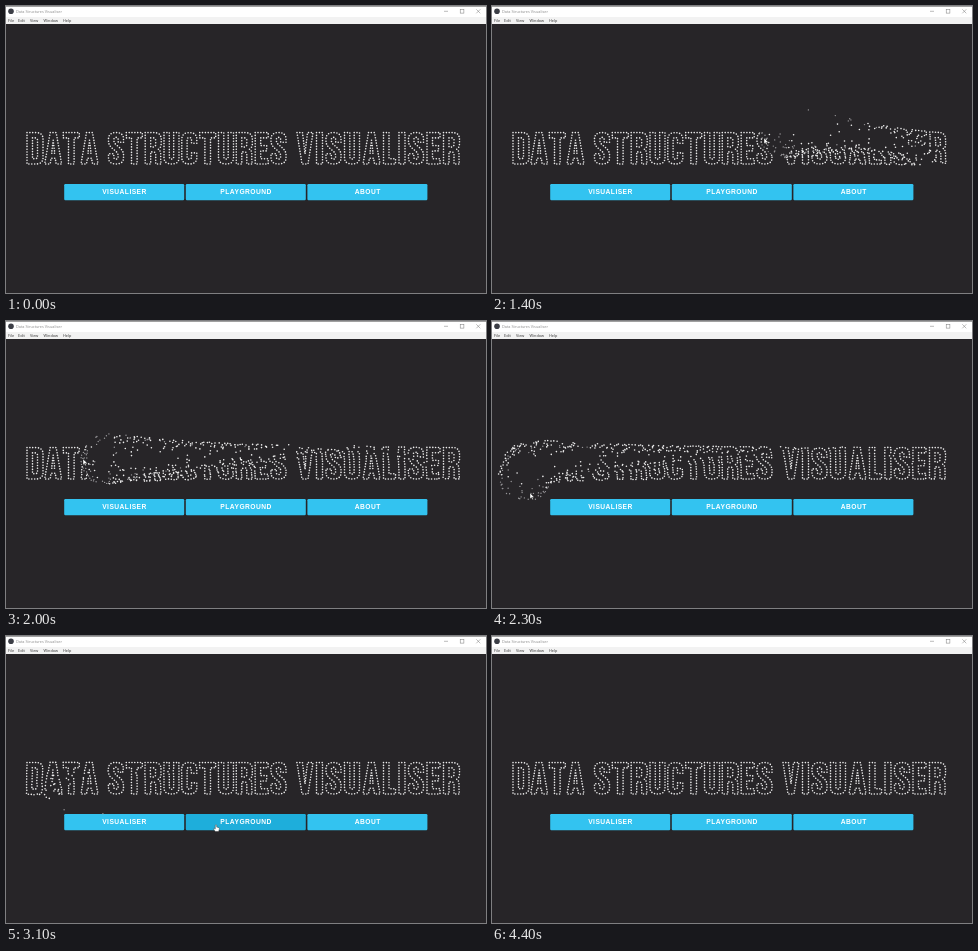
These frames come from a looping animation (480x287 px, 4.7 s). An HTML page:

```html
<!DOCTYPE html>
<html lang="en">
<head>
<meta charset="utf-8">
<title>Data Structures Visualiser</title>
<style>
  html, body { margin: 0; width: 100%; height: 100%; overflow: hidden; background: #272528; }
  svg { display: block; width: 100vw; height: 100vh; }
  .ui { font-family: "Open Sans", "Noto Sans", sans-serif; font-size: 3.85px; }
  .label { font: bold 6.7px "Liberation Sans", Arial, sans-serif; letter-spacing: .45px; fill: #fff; text-anchor: middle; }
  .dots { fill: none; stroke: #ededed; stroke-width: 1.6; stroke-linecap: round; }
  .dots.fast { stroke: #98979a; stroke-width: 1.4; }
  .cursor { fill: #fff; stroke: #222; stroke-width: .4; stroke-linejoin: round; }
</style>
</head>
<body>
<svg id="stage" viewBox="0 0 480 287">
  <rect width="480" height="287" fill="#272528"/>
  <rect width="480" height="18" fill="#fff"/>
  <rect y="11" width="480" height="7" fill="#f2f2f2"/>
  <rect width="480" height=".7" fill="#777"/>
  <circle cx="5" cy="5.3" r="2.8" fill="#3c3e46"/>
  <g class="ui" id="chrome">
    <text x="10" y="6.9" fill="#8a8a8a">Data Structures Visualiser</text>
  </g>
  <g fill="none" stroke="#777" stroke-width=".5">
    <path d="M438 5.3h4M470.3 3.3l4 4m0-4l-4 4"/>
    <rect x="454.2" y="3.4" width="3.7" height="3.7"/>
  </g>
  <g id="buttons"></g>
  <path class="dots fast" id="fast"/>
  <path class="dots" id="calm"/>
  <path class="cursor" id="arrow" d="M0 0V5.8L1.4 4.6L2.4 6.7L3.3 6.3L2.4 4.2H4.2Z"/>
  <path class="cursor" id="hand" d="M-.7 .5Q0-.5 .7 .5V2.6L3 3.2Q3.6 3.5 3.4 4.4L2.6 7H-.8L-2.4 4.4Q-2.3 3.5-1.4 3.9L-.7 4.4Z"/>
</svg>
<script>
const LOOP = 4700, FRAME = 100, SUBSTEPS = 4;
const RADIUS = 27, LAG = 65, SPACING = 2.85, TOP = 126.6, STRETCH = 0.965;

const $ = id => document.getElementById(id);

function add(parent, tag, attrs, text = '') {
  const node = document.createElementNS('http://www.w3.org/2000/svg', tag);
  for (const key in attrs) node.setAttribute(key, attrs[key]);
  node.textContent = text;
  parent.append(node);
  return node;
}

// Each glyph: width and outline contours
const glyphs = {
  D: [16, 'M0 0H9Q16 0 16 7V26Q16 32.5 9 32.5H0Z M5.5 5.5V27H8Q10.5 27 10.5 25V8Q10.5 5.5 8 5.5Z'],
  A: [17, 'M5.5 0H11.5L17 32.5H11.5L10.6 26.5H6.4L5.5 32.5H0Z M8.5 8L6.9 21.5H10.1Z'],
  T: [16, 'M0 0H16V5.5H10.8V32.5H5.2V5.5H0Z'],
  S: [15, 'M15 10V7Q15 0 7.5 0Q0 0 0 7V9Q0 13 4 16.5L7 19Q9.7 21.5 9.7 24Q9.7 27.5 7.5 27.5Q5.3 27.5 5.3 25V22H0V26Q0 32.5 7.5 32.5Q15 32.5 15 26V23Q15 19 11 15.5L8 13Q5.3 10.5 5.3 8Q5.3 5 7.5 5Q9.7 5 9.7 8V10Z'],
  R: [16, 'M0 0H9Q16 0 16 7V11Q16 16 13 17.3Q15.5 18.5 15.5 22V29L16 32.5H10.5V23Q10.5 20 8 20H5.5V32.5H0Z M5.5 5.5V15H8Q10.5 15 10.5 12V8Q10.5 5.5 8 5.5Z'],
  U: [15, 'M0 0H5.3V25Q5.3 27.5 7.5 27.5Q9.7 27.5 9.7 25V0H15V26Q15 32.5 7.5 32.5Q0 32.5 0 26Z'],
  C: [15, 'M15 11V7Q15 0 7.5 0Q0 0 0 7V26Q0 32.5 7.5 32.5Q15 32.5 15 26V21H9.7V25Q9.7 27.5 7.5 27.5Q5.3 27.5 5.3 25V8Q5.3 5 7.5 5Q9.7 5 9.7 8V11Z'],
  E: [13, 'M0 0H13V5.5H5.5V13.5H11.5V19H5.5V27H13V32.5H0Z'],
  V: [16, 'M0 0H5.5L8 22L10.5 0H16L11 32.5H5Z'],
  I: [6, 'M0 0H6V32.5H0Z'],
  L: [12, 'M0 0H5.5V27H12V32.5H0Z']
};
const words = [['DATA', 21, 92], ['STRUCTURES', 102.5, 280], ['VISUALISER', 291, 453.5]];

// Pointer path: time, x, y
const track = [
  [300, 474, 270], [600, 452, 188], [700, 440, 160], [800, 430, 143], [900, 420, 139],
  [1000, 396, 133], [1200, 334, 125], [1300, 303, 124], [1400, 272, 132],
  [1700, 172, 135], [2000, 77, 138], [2100, 48, 140], [2200, 30, 150], [2300, 38, 172],
  [2400, 64, 186], [2700, 92, 191], [2900, 125, 190], [3300, 295, 187], [3500, 367, 188],
  [3700, 378, 191], [3900, 345, 220], [4200, 259, 269], [4300, 268, 277]
];

function pointer(time) {
  const next = track.findIndex(key => key[0] >= time);
  if (next < 0 || time < track[0][0]) return null;
  const b = track[next], a = track[Math.max(0, next - 1)];
  const k = (time - a[0]) / (b[0] - a[0] || 1);
  return { x: a[1] + (b[1] - a[1]) * k, y: a[2] + (b[2] - a[2]) * k };
}

let seed = 7;
const random = () => (seed = seed * 16807 % 2147483647) / 2147483647;

function makeParticles() {
  const list = [], probe = add($('stage'), 'path', { fill: 'none' });
  for (const [word, left, right] of words) {
    const total = [...word].reduce((sum, c) => sum + glyphs[c][0], 0);
    const gap = (right - left - total) / (word.length - 1);
    let x = left;
    for (const letter of word) {
      const [width, outline] = glyphs[letter];
      for (const contour of outline.split(/ (?=M)/)) {
        probe.setAttribute('d', contour);
        const length = probe.getTotalLength(), count = Math.round(length / SPACING);
        for (let i = 0; i < count; i++) {
          const p = probe.getPointAtLength(length * i / count);
          const home = { x: x + p.x, y: TOP + p.y * STRETCH };
          list.push({ home, x: home.x, y: home.y, push: 1 + 14 * random(), speed: 0 });
        }
      }
      x += width + gap;
    }
  }
  probe.remove();
  return list;
}

function move(p, mouse) {
  const { x, y } = p;
  const dx = mouse ? mouse.x - x : RADIUS, dy = mouse ? mouse.y - y : 0;
  const distance = Math.hypot(dx, dy) || 1;
  if (distance < RADIUS) {
    const force = (RADIUS - distance) / RADIUS * p.push;
    p.x -= dx / distance * force;
    p.y -= dy / distance * force;
  } else {
    p.x -= (x - p.home.x) / 10;
    p.y -= (y - p.home.y) / 10;
  }
  p.speed = Math.hypot(p.x - x, p.y - y);
}

const dotPath = list => list.map(p => `M${p.x.toFixed(1)} ${p.y.toFixed(1)}h.01`).join('');

// The whole loop is simulated once, so any time can be drawn directly
function simulate() {
  const particles = makeParticles(), frames = [];
  for (let time = 0; time < LOOP; time += FRAME) {
    for (let s = 1; s <= SUBSTEPS && time; s++) {
      const mouse = pointer(time - FRAME + FRAME * s / SUBSTEPS - LAG);
      particles.forEach(p => move(p, mouse));
    }
    frames.push({
      calm: dotPath(particles.filter(p => p.speed < 1.6)),
      fast: dotPath(particles.filter(p => p.speed >= 1.6))
    });
  }
  return frames;
}

[['File', 2], ['Edit', 12], ['View', 24], ['Window', 37.5], ['Help', 57]].forEach(([name, x]) =>
  add($('chrome'), 'text', { x, y: 15.6, fill: '#333' }, name));

const BUTTON = { y: 178, width: 120, height: 16.3, rx: 1.2 };
const buttons = ['VISUALISER', 'PLAYGROUND', 'ABOUT'].map((name, i) => {
  const x = 58.2 + i * 121.6;
  const rect = add($('buttons'), 'rect', { x, ...BUTTON });
  add($('buttons'), 'text', { x: x + 60.3, y: 188.3, class: 'label' }, name);
  return { x, rect };
});

const frames = simulate();

function draw(time) {
  const index = Math.floor(time / FRAME);
  const mouse = pointer(index * FRAME);
  let over = false;
  for (const { x, rect } of buttons) {
    const hit = !!mouse && mouse.x >= x && mouse.x <= x + BUTTON.width
      && mouse.y >= BUTTON.y && mouse.y <= BUTTON.y + BUTTON.height;
    rect.setAttribute('fill', hit ? '#1eaedb' : '#33c3f0');
    over = over || hit;
  }
  for (const id of ['calm', 'fast']) $(id).setAttribute('d', frames[index][id]);
  for (const id of ['arrow', 'hand']) {
    const shown = mouse && over === (id === 'hand');
    $(id).setAttribute('visibility', shown ? 'visible' : 'hidden');
    if (shown) $(id).setAttribute('transform', `translate(${mouse.x} ${mouse.y})`);
  }
}

const start = performance.now();
function tick() {
  draw((performance.now() - start) % LOOP);
  requestAnimationFrame(tick);
}
tick();
</script>
</body>
</html>
```
